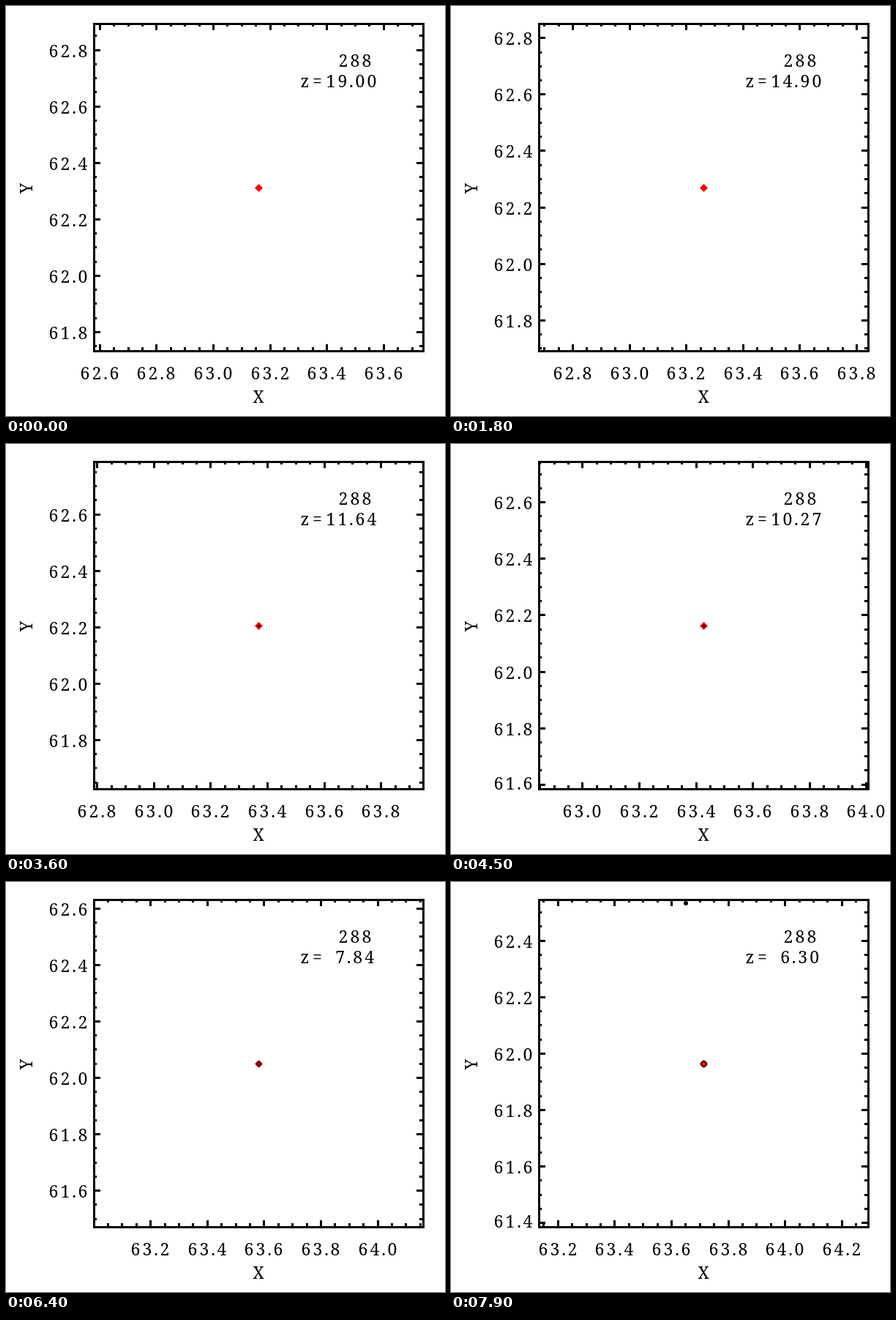
These frames come from a looping animation (600x560 px, 8 s). An HTML page with a canvas:

```html
<!DOCTYPE html>
<html lang="en">
<head>
<meta charset="utf-8">
<title>Halo track</title>
<style>
html, body { margin: 0; width: 100%; height: 100%; overflow: hidden; background: #fff; }
canvas { display: block; width: 600px; height: 560px; }
</style>
</head>
<body>
<canvas id="stage" width="600" height="560"></canvas>
<script>
const ctx = document.getElementById('stage').getContext('2d');
const STEP = 100, COUNT = 80;
const LEFT = 120.5, RIGHT = 570.5, TOP = 24.5, BOTTOM = 471.5;
const MID_X = 345.5, MID_Y = 247.4;
const SCALE_X = 388, SCALE_Y = 385.5, HALF = 0.58;
const MARK_X = 345.5, MARK_Y = 248.5;
const DIGIT = 16;
const FONT = '300 23px "Noto Serif", "Liberation Serif", serif';
const RING_FROM = 20, NEIGHBOUR_FROM = 79;

// Halo path: step, x, y
const path = [
  [0, 63.16, 62.314],
  [9, 63.209, 62.295],
  [27, 63.3147, 62.244],
  [45, 63.427, 62.165],
  [56, 63.511, 62.1025],
  [64, 63.5807, 62.052],
  [79, 63.7134, 61.966]
];

function slope(i, axis) {
  const a = path[Math.max(i - 1, 0)];
  const b = path[Math.min(i + 1, path.length - 1)];
  return (b[axis] - a[axis]) / (b[0] - a[0]);
}

function along(n, axis) {
  let i = 0;
  while (i < path.length - 2 && n >= path[i + 1][0]) i++;
  const a = path[i], b = path[i + 1], h = b[0] - a[0];
  const u = (n - a[0]) / h, v = 1 - u;
  return v * v * (1 + 2 * u) * a[axis] + u * u * (3 - 2 * u) * b[axis]
    + h * u * v * (v * slope(i, axis) - u * slope(i + 1, axis));
}

function advance(ch) {
  const ratio = { '.': 0.5, ' ': 0.8, 'z': 0.85, '=': 1.3 }[ch];
  return DIGIT * (ratio || 1);
}

// Plotter-style spacing: every glyph sits in the middle of its cell
function write(str, x, y, align = 0) {
  const chars = [...str];
  x -= align * chars.reduce((sum, ch) => sum + advance(ch), 0);
  for (const ch of chars) {
    const w = advance(ch);
    ctx.fillText(ch, x + w / 2, y);
    x += w;
  }
}

function line(x1, y1, x2, y2) {
  ctx.beginPath();
  ctx.moveTo(x1, y1);
  ctx.lineTo(x2, y2);
  ctx.stroke();
}

function circle(x, y, r) {
  ctx.beginPath();
  ctx.arc(x, y, r, 0, Math.PI * 2);
}

function eachTick(center, draw) {
  const last = Math.floor((center + HALF) * 20);
  for (let i = Math.ceil((center - HALF) * 20); i <= last; i++) {
    draw(i / 20, i % 4 === 0);
  }
}

// Tick ends fall on whole pixels
const tickEnd = v => Math.floor(v - 0.5);

function drawAxes(cx, cy) {
  ctx.strokeStyle = ctx.fillStyle = '#000';
  ctx.lineWidth = 3;
  ctx.strokeRect(LEFT, TOP, RIGHT - LEFT, BOTTOM - TOP);
  ctx.font = FONT;
  ctx.textAlign = 'center';

  eachTick(cx, (value, major) => {
    const x = Math.floor(MID_X + (value - cx) * SCALE_X) + 0.5;
    const len = major ? 9 : 4.5;
    line(x, BOTTOM, x, tickEnd(BOTTOM - len));
    line(x, TOP, x, tickEnd(TOP + len));
    if (major) write(value.toFixed(1), x - 0.5, 510, 0.5);
  });

  eachTick(cy, (value, major) => {
    const y = Math.floor(MID_Y - (value - cy) * SCALE_Y) + 0.5;
    const len = major ? 9 : 4.5;
    line(LEFT, y, tickEnd(LEFT + len), y);
    line(RIGHT, y, tickEnd(RIGHT - len), y);
    if (major) write(value.toFixed(1), 113, Math.min(y + 9.5, 472), 1);
  });

  ctx.fillText('X', 345, 542);
  ctx.save();
  ctx.translate(36, 249);
  ctx.rotate(-Math.PI / 2);
  ctx.fillText('Y', 0, 0);
  ctx.restore();
}

function drawMarker(n) {
  const r = 5.5;
  ctx.fillStyle = '#f00';
  ctx.beginPath();
  ctx.moveTo(MARK_X, MARK_Y - r);
  ctx.lineTo(MARK_X + r, MARK_Y);
  ctx.lineTo(MARK_X, MARK_Y + r);
  ctx.lineTo(MARK_X - r, MARK_Y);
  ctx.fill();

  // The halo's own ring grows with its mass
  if (n >= RING_FROM) {
    ctx.lineWidth = 1.5;
    circle(MARK_X, MARK_Y, 0.33 * Math.exp(0.031 * n));
    ctx.stroke();
  }
}

function draw(n) {
  ctx.fillStyle = '#fff';
  ctx.fillRect(0, 0, 600, 560);
  drawAxes(along(n, 1), along(n, 2));

  const z = 20 * Math.exp(-0.0127495 * n) - 1;
  write('288', 477, 83, 0.5);
  write('z=' + z.toFixed(2).padStart(5), 401.5, 111);

  if (n >= NEIGHBOUR_FROM) {
    circle(321, 29, 3);
    ctx.fill();
  }
  drawMarker(n);
}

const start = performance.now();
function tick() {
  const t = Math.max(0, performance.now() - start);
  draw(Math.floor(t / STEP) % COUNT);
  requestAnimationFrame(tick);
}
tick();
</script>
</body>
</html>
```
